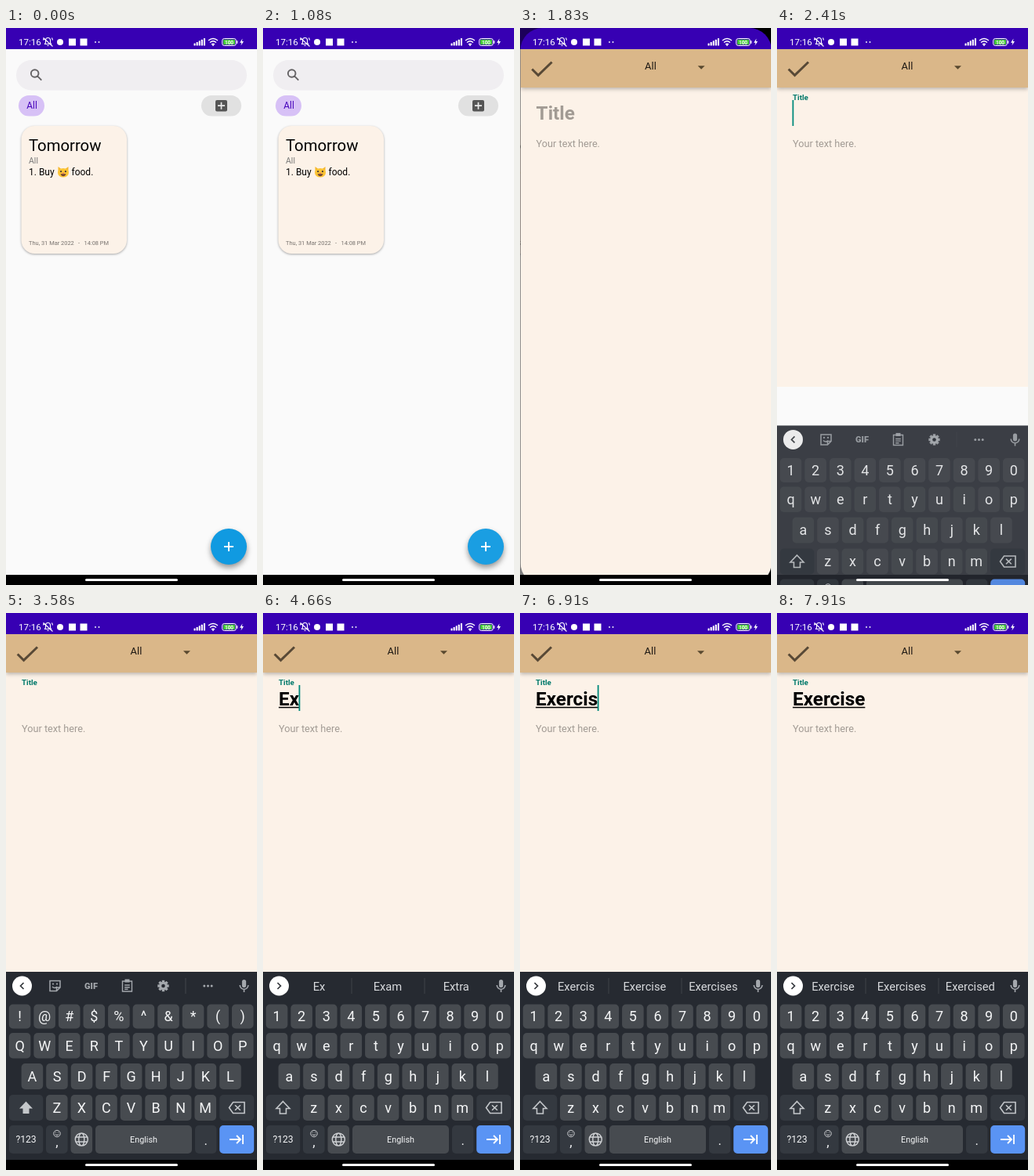
Write an HTML page with a canvas that moves like this. It is 320 px wide and 711 px high and loops after 8 s.

```html
<!DOCTYPE html>
<html lang="en">
<head>
<meta charset="utf-8">
<title>Notes</title>
<style>
  html, body { margin: 0; width: 100%; height: 100%; overflow: hidden; background: #000; }
  canvas { display: block; width: 320px; height: 711px; }
</style>
</head>
<body>
<canvas id="stage"></canvas>
<script>
const W = 320, H = 711, NAV = 698, KEYBOARD = 458, LOOP = 8000;
const PURPLE = '#3700b3', CREAM = '#fcf2e8', TEAL = '#00796b', GREY = '#a29b94', ICON = '#a4a8ad';

const OPEN = 1348, OPENED = 1900, FOCUS = 2060, RISE = 2300, SHIFT = 3050, PRESS = 760;
const WORD = 'Exercise';
const KEY_TIMES = [4080, 4620, 5000, 5330, 5640, 6120, 6520, 6950];
const SUGGESTIONS = [
  ['E', 'Even', 'Every'], ['Ex', 'Exam', 'Extra'], ['Exe', 'Exercise', 'Execute'],
  ['Exer', 'Exercise', 'Exercises'], ['Exerc', 'Exercise', 'Exercises'],
  ['Exerci', 'Exercise', 'Exercises'], ['Exercis', 'Exercise', 'Exercises'],
  ['Exercise', 'Exercises', 'Exercised']
];

const canvas = document.getElementById('stage');
const c = canvas.getContext('2d');
const ratio = window.devicePixelRatio || 1;
canvas.width = W * ratio;
canvas.height = H * ratio;

const clamp = v => Math.max(0, Math.min(1, v));
const mix = (a, b, p) => a + (b - a) * p;

function rect(x, y, w, h, color) {
  c.fillStyle = color;
  c.fillRect(x, y, w, h);
}
function round(x, y, w, h, r, color) {
  c.beginPath();
  c.roundRect(x, y, w, h, r);
  c.fillStyle = color;
  c.fill();
}
function disc(x, y, r, color) {
  c.beginPath();
  c.arc(x, y, r, 0, 7);
  c.fillStyle = color;
  c.fill();
}
function text(s, x, y, size, color, { align = 'left', weight = 400 } = {}) {
  c.font = `${weight} ${size}px Roboto, sans-serif`;
  c.textAlign = align;
  c.fillStyle = color;
  c.fillText(s, x, y);
}
// SVG path data, placed with its own origin at (x, y).
function path(d, x, y, color, { line = 0, scale = 1 } = {}) {
  c.save();
  c.translate(x, y);
  c.scale(scale, scale);
  const shape = new Path2D(d);
  if (line) {
    c.strokeStyle = color;
    c.lineWidth = line;
    c.stroke(shape);
  } else {
    c.fillStyle = color;
    c.fill(shape);
  }
  c.restore();
}
function shadow(color, blur, dy, draw) {
  c.save();
  c.shadowColor = color;
  c.shadowBlur = blur * ratio;
  c.shadowOffsetY = dy * ratio;
  draw();
  c.restore();
}

function statusIcons() {
  const white = '#fff';
  text('17:16', 16, 22, 11.6, white);
  path('M-4 3H4L3 1V-2A3 3 0 0 0-3-2V1ZM-1 5H1M-6-5L6 6M-6-2L-5-5M6-2L5-5', 53.5, 17.5, white, { line: 1.1 });
  disc(69, 18, 4, white);
  rect(80, 13.5, 9, 9, white);
  rect(94.5, 13.5, 9, 9, white);
  disc(114, 18, 0.9, white);
  disc(118.5, 18, 0.9, white);
  for (let i = 0; i < 5; i++) round(239.5 + i * 3.1, 19.5 - i * 1.6, 2.1, 3 + i * 1.6, 0.6, white);
  path('M-6-4Q0-9 6-4M-4-1.5Q0-5 4-1.5M-2 1Q0-.7 2 1', 264, 20, white, { line: 1.4 });
  disc(264, 22, 1, white);
  c.beginPath();
  c.roundRect(275.7, 13.5, 17.6, 9, 2.6);
  c.strokeStyle = white;
  c.lineWidth = 1;
  c.stroke();
  round(277, 14.8, 15, 6.4, 1.3, '#43c838');
  rect(294.2, 16.2, 1.2, 3.6, white);
  text('100', 284.5, 20.5, 6.5, white, { align: 'center', weight: 700 });
  path('M1-4.5L-2.5 .8H-.2L-1 4.5L2.5-1H.3Z', 300.5, 18, white);
}

function cat(x, y) {
  path('M-6.5 1V-7L-2.5-4H2.5L6.5-7V1Z', x, y, '#f5b82e');
  c.beginPath();
  c.ellipse(x, y + 0.8, 7, 5.8, 0, 0, 7);
  c.fillStyle = '#fcc434';
  c.fill();
  disc(x - 2.9, y - 0.8, 1.1, '#453c35');
  disc(x + 2.9, y - 0.8, 1.1, '#453c35');
  path('M-3.5 2.2H3.5Q2.5 5.2 0 5.2T-3.5 2.2Z', x, y, '#704332');
  disc(x, y + 1.3, 0.9, '#e66a70');
}

function home(t) {
  rect(0, 0, W, 27, PURPLE);
  rect(0, 27, W, H - 27, '#fafafa');
  round(13, 41, 294, 38.5, 19.2, '#f0eef1');
  path('M4.2 0A4.8 4.8 0 1 1-5.4 0A4.8 4.8 0 1 1 4.2 0M2.8 3.4L8 8.6', 37.3, 58, '#646264', { line: 1.9 });
  round(16, 86, 33, 26.5, 13.2, '#d7c1f6');
  text('All', 33, 103.3, 12, '#4a08bd', { align: 'center' });
  round(249, 86, 51, 26.5, 13.2, '#e1e1e1');
  round(267, 92, 15, 14.5, 2, '#555');
  path('M-4.5 0H4.5M0-4.5V4.5', 274.5, 99.2, '#e9e9e9', { line: 1.7 });

  shadow('#0005', 3, 1, () => round(19.5, 125, 134.5, 163, 17, CREAM));
  text('Tomorrow', 29, 157, 20.3, '#000');
  text('All', 29, 173, 10.5, '#777');
  text('1. Buy', 29, 188, 12, '#000');
  cat(73, 184);
  text('food.', 83.5, 188, 12, '#000');
  text('Thu, 31 Mar 2022', 29, 276.5, 7.45, '#76716d');
  text('-', 92, 276.5, 7.45, '#76716d');
  text('14:08 PM', 99.5, 276.5, 7.45, '#76716d');

  shadow('#0006', 7, 4, () => disc(284, 662, 23, '#109ae1'));
  const press = (t - PRESS) / 400;
  if (press > 0 && press < 1) disc(284, 662, 23 * Math.min(1, press * 2), `rgba(255,255,255,${0.22 * (1 - press)})`);
  path('M-6 0H6M0-6V6', 284, 662, '#fff', { line: 1.9 });
}

function editor(t) {
  const focused = t >= FOCUS;
  const typed = KEY_TIMES.filter(k => k <= t).length;
  rect(0, 27, W, H - 27, CREAM);
  shadow('#0004', 5, 2, () => rect(0, 27, W, 49, '#dab789'));
  rect(0, 0, W, 27, PURPLE);
  path('M14.7 52.5L22.6 60.3L40 43.5', 0, 0, '#584936', { line: 3 });
  text('All', 158.5, 53, 13, '#211b15');
  path('M226 48.3H235L230.5 52.8Z', 0, 0, '#59492f');

  const float = clamp((t - FOCUS) / 167);
  const p = float * float * (3 - 2 * float);
  text('Title', 20, mix(117, 92, p), mix(24.3, 9.8, p), focused ? TEAL : GREY, { weight: 700 });
  text('Your text here.', 20, 152.3, 12.7, GREY);
  if (!focused) return;

  const word = WORD.slice(0, typed);
  text(word, 20, 118, 24.3, '#000', { weight: 700 });
  const width = c.measureText(word).width;
  if (typed) rect(20, 119.8, width, 1.5, '#000');
  const lastInput = typed ? KEY_TIMES[typed - 1] : FOCUS;
  if ((t - lastInput) % 1000 < 500) rect(19.5 + width, 92, 1.8, 33, '#00897b');
}

function key(x, y, w, h, color, label, size = 18) {
  round(x, y, w, h, 5, color);
  if (label) text(label, x + w / 2, y + h / 2 + size * 0.36, size, '#f5f6f7', { align: 'center' });
}

function mic(x, y) {
  round(x - 2.6, y - 8, 5.2, 10, 2.6, ICON);
  path('M-5.3-1A5.3 5.3 0 0 0 5.3-1M0 4V8', x, y, ICON, { line: 1.6 });
}

function toolbar() {
  path('M-6.5-6.5H6.5V2L2 6.5H-6.5ZM6.5 2H2V6.5M-3.5 1Q-.5 4 2.5 1', 62.5, 18, ICON, { line: 1.5 });
  disc(60, 15.5, 1.1, ICON);
  disc(65, 15.5, 1.1, ICON);
  text('GIF', 108.5, 22, 11, ICON, { align: 'center', weight: 900 });
  path('M-6-6H6V7H-6ZM-3.3-1H3.3M-3.3 1.7H3.3M-3.3 4.3H1', 154.5, 18, ICON, { line: 1.4 });
  rect(151.5, 9.5, 6, 4, ICON);
  for (let i = 0; i < 4; i++) {
    c.save();
    c.translate(200.5, 18);
    c.rotate(i * Math.PI / 4);
    rect(-1.7, -7.2, 3.4, 14.4, ICON);
    c.restore();
  }
  disc(200.5, 18, 5.4, ICON);
  disc(200.5, 18, 2.3, '#262a31');
  rect(228.5, 8, 1, 20, '#43474d');
  for (let i = -1; i < 2; i++) disc(257.5 + i * 4.7, 18, 1.5, ICON);
}

// Drawn with its top edge at y = 0.
function keyboard(t) {
  const typed = KEY_TIMES.filter(k => k <= t).length;
  const upper = t >= SHIFT && !typed;
  const plain = '#474b50', dark = '#343940';
  rect(0, 0, W, 240, '#262a31');
  rect(0, 240, W, 13, '#000');

  disc(20.5, 18, 12.5, '#fff');
  path(typed ? 'M-2-4L2 0L-2 4' : 'M2-4L-2 0L2 4', 20.5, 18, '#33373c', { line: 1.7 });
  mic(303.5, 18);
  if (typed) {
    SUGGESTIONS[typed - 1].forEach((s, i) =>
      text(s, 71.5 + i * 87.4, 24, 14.7, '#d9dbde', { align: 'center' }));
    rect(112.5, 8, 1, 20, '#3f4349');
    rect(205.5, 8, 1, 20, '#3f4349');
  } else toolbar();

  const rows = [
    [upper ? '!@#$%^&*()' : '1234567890', 3.8, 41.5, 31],
    ['qwertyuiop', 3.8, 78, 32.5],
    ['asdfghjkl', 19.6, 117, 33],
    ['zxcvbnm', 51, 157, 33]
  ];
  for (const [letters, x, y, h] of rows)
    [...letters].forEach((s, i) => key(x + i * 31.57, y, 27.6, h, plain, upper ? s.toUpperCase() : s));

  key(3.8, 157, 43.5, 33, dark);
  const arrow = 'M0-8L8.5 1H4V7.5H-4V1H-8.5Z';
  path(arrow, 25.5, 173.5, '#c4c7ca', upper ? {} : { line: 1.6 });
  key(272.2, 157, 44, 33, dark);
  path('M-10 0L-5-7H9.5V7H-5ZM-2.5-3.3L4.3 3.3M4.3-3.3L-2.5 3.3', 294.5, 173.5, '#c4c7ca', { line: 1.6 });

  const y = 196, h = 36;
  key(3.8, y, 43.5, h, dark, '?123', 12.2);
  key(51, y, 27.6, h, dark);
  text(',', 65, y + 27, 17, '#f5f6f7', { align: 'center' });
  path('M4.2 0A4.2 4.2 0 1 1-4.2 0A4.2 4.2 0 1 1 4.2 0M-2.2 1Q0 3.4 2.2 1M-2-1.6H-1M1-1.6H2', 65, y + 10.5, '#d0d2d5', { line: 1 });
  key(82.5, y, 27.6, h, plain);
  path('M8 0A8 8 0 1 1-8 0A8 8 0 1 1 8 0M3.5 0A3.5 8 0 1 1-3.5 0A3.5 8 0 1 1 3.5 0M-7.3-3H7.3M-7.3 3H7.3', 96.3, y + 18, '#d0d2d5', { line: 1.4 });
  key(114, y, 123, h, plain, 'English', 10.8);
  key(241, y, 27.5, h, dark);
  text('.', 254.7, y + 25, 17, '#f5f6f7', { align: 'center' });
  key(272.2, y, 44, h, '#5a94f4');
  path('M-9 0H5M0-5L5 0L0 5M8-6V6', 294, y + 18, '#fff', { line: 1.8 });
}

function draw(t) {
  c.setTransform(ratio, 0, 0, ratio, 0, 0);
  rect(0, 0, W, H, '#000');

  // The editor slides in on a critically damped spring while the list drifts left and dims.
  const phase = Math.max(0, t - OPEN) * 0.0176;
  const left = (1 + phase) * Math.exp(-phase);
  if (t < OPENED) {
    c.save();
    c.translate(-80 * (1 - left), 0);
    home(t);
    rect(0, 0, W, H, `rgba(0,0,0,${0.5 * (1 - left)})`);
    c.restore();
  }
  if (t > OPEN) {
    c.save();
    if (t < OPENED) {
      c.translate(W * left, 0);
      c.beginPath();
      c.roundRect(0, 0, W, H, 28);
      c.clip();
    }
    editor(t);
    c.restore();
  }

  const rising = t >= RISE;
  if (rising) rect(0, KEYBOARD, W, H - KEYBOARD, '#fafafa');
  rect(0, NAV, W, H - NAV, '#000');
  if (rising) {
    c.save();
    c.globalAlpha = clamp(0.55 + (t - RISE) / 320);
    c.translate(0, KEYBOARD + 253 * Math.exp((RISE - t) / 68));
    keyboard(t);
    c.restore();
  }
  statusIcons();
  round(101, 703, 118, 3, 1.5, '#fff');
}

const start = performance.now();
function frame() {
  draw((performance.now() - start) % LOOP);
  requestAnimationFrame(frame);
}
frame();
</script>
</body>
</html>
```
